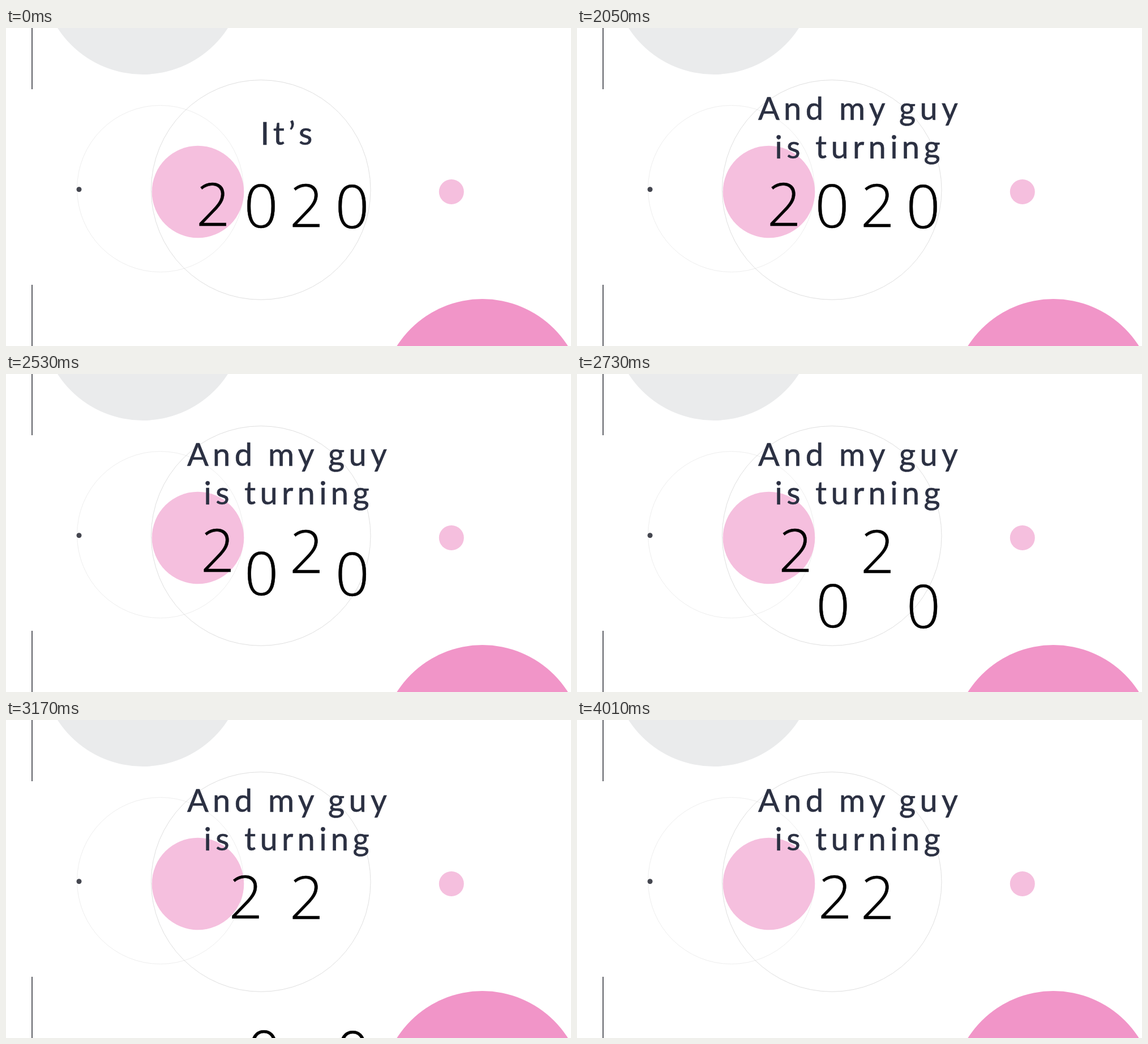
Write an HTML page that moves like this. It is 998x561 px and loops after 5060 ms.

```html
<!DOCTYPE html>
<html lang="en">
<head>
<meta charset="utf-8">
<title>Turning 22</title>
<style>
  html, body { margin: 0; width: 100%; height: 100%; overflow: hidden; background: #fff; }
  svg { display: block; width: 100%; height: 100%; }
  .words { font: 56px Lato, sans-serif; letter-spacing: 7.3px; fill: #2b3042; stroke: #2b3042; stroke-width: .6; }
  .digits { font: 300 105px "Open Sans", sans-serif; text-anchor: middle; fill: #000; stroke: #000; stroke-width: .5; }
  .ring { fill: none; stroke-width: 1; }
</style>
</head>
<body>
<svg viewBox="0 0 998 561">
  <circle cx="241.5" cy="-97" r="179" fill="#eaebec"/>
  <circle cx="841.5" cy="657" r="179" fill="#f195c8"/>
  <circle class="ring" cx="272.5" cy="283.5" r="147" stroke="#eee"/>
  <circle class="ring" cx="450.2" cy="285.5" r="193.8" stroke="#dfdfdf"/>
  <circle cx="339" cy="289" r="81.3" fill="#f5bfde"/>
  <circle cx="786.8" cy="289" r="22" fill="#f5bfde"/>
  <circle cx="129" cy="284.8" r="4.5" fill="#44464f"/>
  <path d="M46 0V108M46 453V561" stroke="#383b42" stroke-width="1.6"/>

  <g class="words" id="intro">
    <text x="449.5" y="206">It’s</text>
  </g>
  <g class="words" id="message">
    <text x="320" y="161.5">And</text>
    <text x="463" y="161.5">my</text>
    <text x="569" y="161.5">guy</text>
    <text x="349.5" y="230">is</text>
    <text x="421" y="230">turning</text>
  </g>
  <g class="digits" id="digits"></g>
</svg>
<script>
  const LOOP = 5060, MESSAGE_AT = 1050, MORPH_AT = 2050, STEP = 40;
  const EASE_START = 2086, EASE_LENGTH = 1880;

  // dx, dy: how far each digit travels during the morph
  const digits = [
    { char: '2', x: 366,   y: 349,   dx: 90, dy: 1 },
    { char: '0', x: 450.5, y: 352,   dx: 8,  dy: 424 },
    { char: '2', x: 531,   y: 350.5, dx: 0,  dy: 0 },
    { char: '0', x: 611.5, y: 353,   dx: 2,  dy: 424 }
  ];

  const byId = id => document.getElementById(id);
  const show = (id, visible) => byId(id).setAttribute('visibility', visible ? 'visible' : 'hidden');

  for (const digit of digits) {
    digit.node = document.createElementNS('http://www.w3.org/2000/svg', 'text');
    digit.node.textContent = digit.char;
    byId('digits').append(digit.node);
  }

  function progress(time) {
    const stepped = MORPH_AT + Math.floor((time - MORPH_AT) / STEP) * STEP;
    const u = Math.min(1, Math.max(0, (stepped - EASE_START) / EASE_LENGTH));
    return u * u * u * (10 - 15 * u + 6 * u * u);
  }

  function draw(time) {
    show('intro', time < MESSAGE_AT);
    show('message', time >= MESSAGE_AT);
    const p = progress(time);
    for (const { node, x, y, dx, dy } of digits) {
      node.setAttribute('x', x + dx * p);
      node.setAttribute('y', y + dy * p);
    }
  }

  const start = performance.now();
  function tick() {
    draw((performance.now() - start) % LOOP);
    requestAnimationFrame(tick);
  }
  tick();
</script>
</body>
</html>
```
